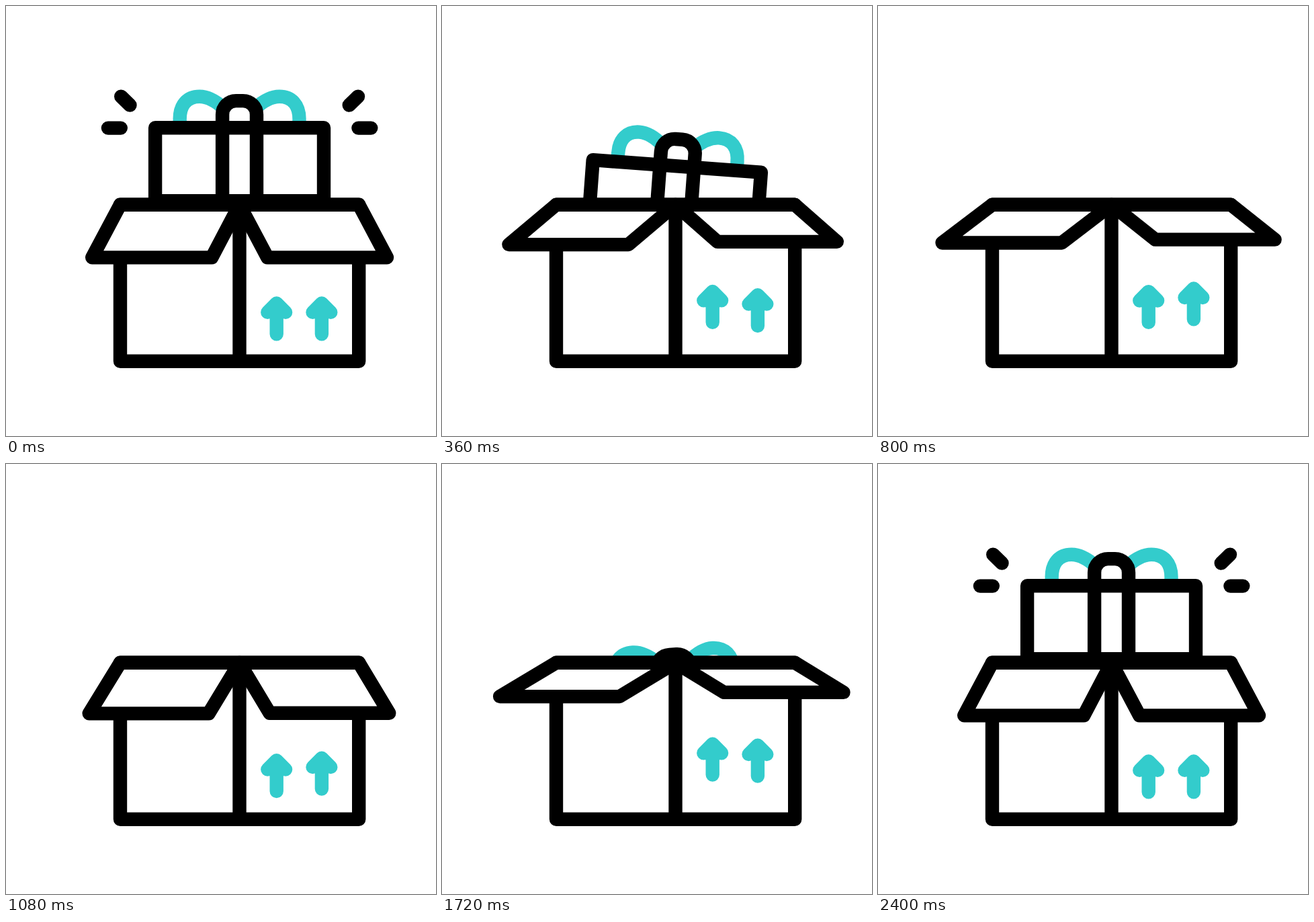
These frames come from a looping animation (640 by 640 pixels, 2420 ms). An HTML page:

```html
<!DOCTYPE html>
<html lang="en">
<head>
<meta charset="utf-8">
<title>Gift box</title>
<style>
  html, body { margin: 0; width: 100%; height: 100%; overflow: hidden; background: #fff; }
  svg {
    display: block; width: 100%; height: 100%;
    fill: none; stroke: #000; stroke-width: 20.4;
    stroke-linecap: round; stroke-linejoin: round;
  }
  .teal { stroke: #33cccc; }
  .solid { fill: #fff; }

  .gift, .arrow, .flap, .sparks path {
    animation: 2420ms cubic-bezier(.3333, 0, .6667, 1) infinite;
  }
  .gift { transform-origin: 347.5px 212px; animation-name: sink, tilt; }
  .arrow { animation-name: bob1; }
  .arrow.late { animation-name: bob2; }
  .left { animation-name: flapLeft; }
  .right { animation-name: flapRight; }
  .sparks path { stroke-dasharray: 1 3; animation-name: spark; }

  /* The last 20 ms (99.174% on) repeat the first pose. */
  @keyframes sink {
    0%, 99.174%, 100% { translate: 0 0; }
    39.669%, 59.504% { translate: 0 179.5px; }
  }
  @keyframes tilt {
    0%, 39.669%, 59.504%, 99.174%, 100% { rotate: 0deg; }
    19.835% { rotate: 5deg; }
    79.339% { rotate: -5deg; }
  }
  @keyframes bob1 {
    0%, 47.934%, 95.868%, 100% { translate: 0 0; }
    23.967%, 71.901% { translate: 0 -25.8px; }
  }
  @keyframes bob2 {
    0%, 3.306%, 51.24%, 99.174%, 100% { translate: 0 0; }
    27.273%, 75.207% { translate: 0 -25.8px; }
  }
  @keyframes flapLeft {
    0%, 49.587%, 99.174%, 100% { d: path("M170 295.8 L347.5 295.8 L306.2 374.4 L128.2 374.4 Z"); }
    24.793%, 74.38% { d: path("M170 295.8 L347.5 295.8 L262 344.7 L84 344.7 Z"); }
  }
  @keyframes flapRight {
    0%, 49.587%, 99.174%, 100% { d: path("M525.2 295.8 L347.5 295.8 L389.2 374.4 L567 374.4 Z"); }
    24.793%, 74.38% { d: path("M525.2 295.8 L347.5 295.8 L421.2 338.2 L599 338.2 Z"); }
  }
  @keyframes spark {
    0%, 89.256%, 100% { stroke-dashoffset: 0; visibility: visible; }
    9.091%, 80.165% { stroke-dashoffset: 1; visibility: hidden; }
  }
</style>
</head>
<body>
<svg viewBox="0 0 640 640">
  <g class="sparks">
    <path pathLength="1" d="M184.5 147.6 L171.2 134.6"/>
    <path pathLength="1" d="M170.8 181.6 H151.9"/>
    <path pathLength="1" d="M510.7 147.6 L524 134.6"/>
    <path pathLength="1" d="M524.4 181.6 H543.3"/>
  </g>

  <g class="gift">
    <path class="teal" d="M258.7 181 V168 C258.7 147 270 134.7 288 134.7 C302 134.7 314 143 324 152"/>
    <path class="teal" d="M436.5 181 V168 C436.5 147 425 134.7 407 134.7 C393 134.7 381 143 371 152"/>
    <path d="M222.1 181.2 H473 V290.3 H222.1 Z"/>
    <path d="M322.1 290.3 V161.4 A20.3 20.3 0 0 1 342.4 141.1 H352.7 A20.3 20.3 0 0 1 373 161.4 V290.3"/>
  </g>

  <path class="solid" d="M170 295.8 H525.2 V528.7 H170 Z M347.5 295.8 V528.7"/>
  <path class="flap left solid" d="M170 295.8 L347.5 295.8 L306.2 374.4 L128.2 374.4 Z"/>
  <path class="flap right solid" d="M525.2 295.8 L347.5 295.8 L389.2 374.4 L567 374.4 Z"/>

  <path class="arrow teal" d="M402.7 488.3 V442.5 M389.3 455.9 L402.7 442.5 L416.1 455.9"/>
  <path class="arrow late teal" d="M469.9 488.3 V442.5 M456.5 455.9 L469.9 442.5 L483.3 455.9"/>
</svg>
</body>
</html>
```
